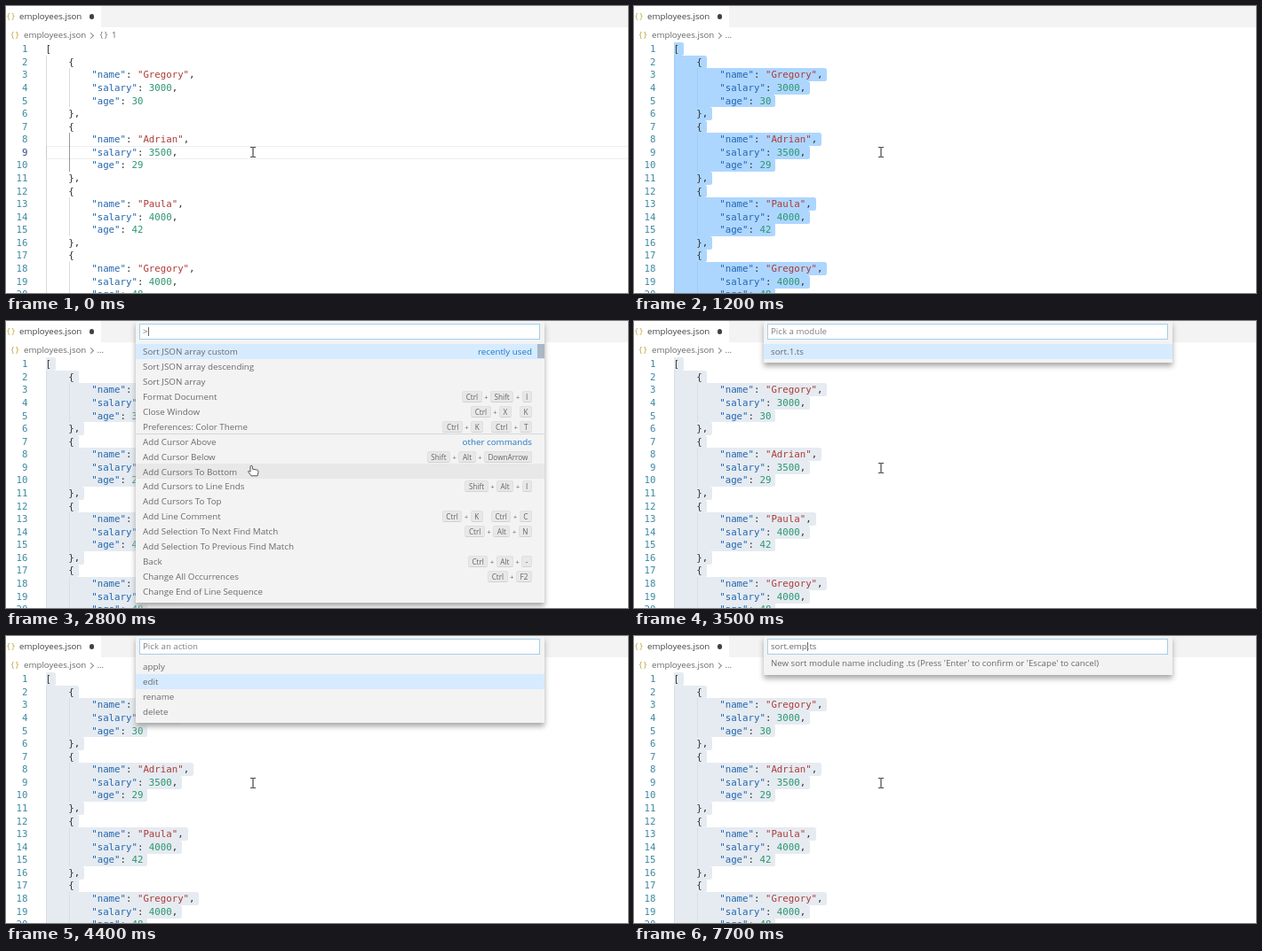
Animation of 700 by 324 pixels, one loop 8 s. Source, as an HTML page:

```html
<!DOCTYPE html>
<html lang="en">
<head>
<meta charset="utf-8">
<title>Sorting a JSON array</title>
<style>
html, body { margin: 0; width: 100%; height: 100%; overflow: hidden; background: #fff; }
body { position: relative; font: 9.7px "Open Sans", sans-serif; color: #6a6a6a; }
body div, .abs { position: absolute; white-space: pre; box-sizing: border-box; }
#stage { left: 0; top: 0; width: 700px; height: 324px; overflow: hidden; }
.mid { line-height: 20px; }
.json { letter-spacing: 1.6px; color: #bda63a; }
.chevron { width: 5px; height: 5px; border: solid #888; border-width: 1px 1px 0 0; transform: rotate(45deg); }
.code { font: 10.74px/14.58px "DejaVu Sans Mono", monospace; color: #333; }
.num { left: 0; width: 24.5px; text-align: right; color: #3f8aa1; }
.num.on { color: #2d4583; }
.key { color: #2366ae; } .str { color: #ad3a36; } .val { color: #2c966f; }
.sel { border-radius: 0 2.5px 2.5px 0; }
.picker { left: 146px; top: 0; width: 460px; background: #f3f3f3; box-shadow: 0 4px 6px #a8a8a8; }
.input { left: 4px; top: 3px; width: 451px; height: 18px; border: 1px solid #a3cfec; background: #fff; padding-left: 3px; line-height: 16px; }
.hint { color: #808080; }
.picked { background: #add6ff; }
.input i { display: inline-block; width: 1px; height: 10px; margin-right: -1px; background: #666; vertical-align: -2px; }
.row { left: 0; width: 460px; height: 16.885px; padding: 1px 14px 0 8px; display: flex; align-items: center; font-size: 9.8px; }
.row span:first-child { flex: 1; }
.row.first { border-top: 1px solid #d6d7da; }
.group { color: #1f78c4; }
kbd { font: 8.2px/11px "Open Sans", sans-serif; padding: 0 3.6px; border: 1px solid #e0e0e0; border-bottom-color: #d2d2d2; border-radius: 2.5px; background: #e8e8e8; color: #666; }
.plus { font-size: 8px; margin: 0 2.3px; }
.gap { width: 9px; }
</style>
</head>
<body>
<div id="stage"></div>
<script>
const LOOP = 8000, LEFT = 44.5, CHAR = 6.466, LINE = 14.58, TOP = 41.2, ROW = 16.885;
const stage = document.getElementById('stage');

const people = [['Gregory', 3000, 30], ['Adrian', 3500, 29], ['Paula', 4000, 42], ['Gregory', 4000, 48]];
const lines = ['['];
for (const [name, salary, age] of people)
  lines.push('    {', `        "name": "${name}",`, `        "salary": ${salary},`, `        "age": ${age}`, '    },');
lines.length = 20;

const commands = [
  ['Sort JSON array custom', '', 'recently used'],
  ['Sort JSON array descending'],
  ['Sort JSON array'],
  ['Format Document', 'Ctrl+Shift+I'],
  ['Close Window', 'Ctrl+X K'],
  ['Preferences: Color Theme', 'Ctrl+K Ctrl+T'],
  ['Add Cursor Above', '', 'other commands'],
  ['Add Cursor Below', 'Shift+Alt+DownArrow'],
  ['Add Cursors To Bottom'],
  ['Add Cursors to Line Ends', 'Shift+Alt+I'],
  ['Add Cursors To Top'],
  ['Add Line Comment', 'Ctrl+K Ctrl+C'],
  ['Add Selection To Next Find Match', 'Ctrl+Alt+N'],
  ['Add Selection To Previous Find Match'],
  ['Back', 'Ctrl+Alt+-'],
  ['Change All Occurrences', 'Ctrl+F2'],
  ['Change End of Line Sequence']
];
const modules = [['sort.1.ts']];
const actions = [['apply'], ['edit'], ['rename'], ['delete']];
const prompt = "New sort module name including .ts (Press 'Enter' to confirm or 'Escape' to cancel)";

// Each entry changes part of the state; "|" in the input is the caret.
const timeline = [
  [0, { active: 9, crumb: '1', sel: null, input: null, items: [], focus: 0, mouseY: 165 }],
  [300, { sel: [9, 8, 9, 22] }],
  [400, { sel: [8, 8, 10, 17], active: 10 }],
  [500, { sel: [7, 4, 11, 5], active: 11 }],
  [700, { sel: [7, 4, 11, 6] }],
  [900, { sel: [2, 4, 21, 0], active: 0 }],
  [1000, { sel: [1, 0, 21, 0] }],
  [1100, { crumb: '' }],
  [1700, { input: '>|' }],
  [1800, { items: commands }],
  [2200, { input: '>' }],
  [2800, { input: '>|' }],
  [2900, { input: '|Pick a module', hint: true, items: modules, mouseY: 166 }],
  [3500, { input: 'Pick a module' }],
  [3900, { input: null }],
  [4000, { input: '|Pick an action', items: actions }],
  [4400, { input: 'Pick an action', focus: 1 }],
  [4700, { input: 'sort.1.ts', hint: false, items: [], picked: true }],
  [5200, { input: 'sort.1.ts|', picked: false }],
  [5400, { input: 'sort.1.t|s' }],
  [5500, { input: 'sort.1.|ts' }],
  [5600, { input: 'sort.1|.ts' }],
  [6100, { input: 'sort.|.ts' }],
  [6400, { input: 'sort.e|.ts' }],
  [6600, { input: 'sort.epm|.ts' }],
  [6900, { input: 'sort.ep|.ts' }],
  [7000, { input: 'sort.e|.ts' }],
  [7500, { input: 'sort.em|.ts' }],
  [7700, { input: 'sort.emp|.ts' }]
];

const box = (x, y, w, h, style = '', cls = '') =>
  `<div class="${cls}" style="left:${x}px;top:${y}px;width:${w}px;height:${h}px;${style}"></div>`;
const label = (x, y, text, cls = '', style = '') =>
  `<div class="mid ${cls}" style="left:${x}px;top:${y - 10}px;${style}">${text}</div>`;
const lineTop = n => TOP + (n - 1) * LINE;

const colour = text => text.replace(/("\w+")(:?)|(\d+)/g, (all, quoted, colon, number) =>
  number ? `<span class="val">${number}</span>`
    : `<span class="${colon ? 'key' : 'str'}">${quoted}</span>${colon}`);

function header(s) {
  return box(107, 0, 593, 24, 'background:#f3f3f3')
    + label(1, 11.5, '{}', 'json')
    + label(15, 12, 'employees.json', '', 'color:#444')
    + box(93.8, 9.2, 5.4, 5.4, 'background:#424242;border-radius:50%')
    + label(5.5, 33, '{}', 'json')
    + label(20, 33, 'employees.json')
    + box(92.5, 31, 5, 5, '', 'chevron')
    + (s.crumb ? label(105.5, 33, '{}', 'json', 'color:#777') + label(119, 33, s.crumb)
      : label(102.5, 33, '…'));
}

function selection(s) {
  if (!s.sel) return box(LEFT, lineTop(s.active), 656, LINE + .5, 'border:solid #eee;border-width:1px 0 1px 1px');
  const [from, fromCol, to, toCol] = s.sel;
  const fill = `background:${s.input === null ? '#add6ff' : '#e5ebf1'}`;
  return lines.map((text, i) => {
    const n = i + 1;
    if (n < from || n > to) return '';
    const start = n === from ? fromCol : 0;
    const end = n === to ? toCol : text.length + .75;
    return box(LEFT + start * CHAR, lineTop(n), (end - start) * CHAR, LINE + .3, fill, 'sel');
  }).join('');
}

function editor(s) {
  const guide = (col, n, alpha) =>
    box(LEFT + .5 + col * CHAR, lineTop(n), 1, LINE, `background:rgba(0,0,0,${alpha})`);
  const alpha = s.active ? .14 : .05;
  return selection(s) + lines.map((text, i) => {
    const n = i + 1, y = `top:${lineTop(n) + 1}px`;
    const inner = text.startsWith('        ');
    const current = s.active && n > 7 && n < 11;
    return (i ? guide(0, n, alpha) : '')
      + (inner ? guide(4, n, current ? .4 : alpha) : '')
      + `<div class="code num ${n === s.active ? 'on' : ''}" style="${y}">${n}</div>`
      + `<div class="code" style="left:${LEFT}px;${y}">${colour(text)}</div>`;
  }).join('');
}

const keys = combo => combo.split(' ').map(part =>
  part.split('+').map(k => `<kbd>${k}</kbd>`).join('<span class="plus">+</span>')
).join('<span class="gap"></span>');

function picker(s) {
  if (s.input === null) return '';
  const long = s.items === commands;
  const height = s.items.length ? 30.5 + s.items.length * ROW : 44;
  const rows = s.items.map(([text, combo, group], i) => {
    const fill = i === s.focus ? '#d6ebff' : long && i === 8 ? '#e8e8e8' : 'none';
    return `<div class="row ${group && i ? 'first' : ''}" style="top:${26 + i * ROW}px;background:${fill}">`
      + `<span>${text}</span>${combo ? keys(combo) : ''}${group ? `<span class="group">${group}</span>` : ''}</div>`;
  }).join('');
  const value = s.input.replace('>', '&gt;').replace('|', '<i></i>');
  return `<div class="picker" style="height:${height}px">`
    + `<div class="input ${s.hint ? 'hint' : ''}"><span class="${s.picked ? 'picked' : ''}">${value}</span></div>`
    + rows
    + (long ? box(452, 26, 8, 15.5, 'background:#a9b7c6') : '')
    + (s.items.length || s.input[0] === '>' ? '' : label(8, 31, prompt))
    + '</div>';
}

function mouse(s) {
  const hand = s.input !== null && s.items === commands;
  const shape = hand
    ? '<path d="M-3 1.2V-5q1.2-1.6 2.4 0v3.2l5.2.9q1.6.5 1.4 2.3L5 5.8H-2L-5.6 1.2q0-1.9 2.6 0z" fill="#fff" stroke="#555"/>'
    : '<path d="M-3-5.5h2L0-5 1-5.5h2M-3 5.5h2L0 5 1 5.5h2M0-5V5" fill="none" stroke="#444" stroke-width="1.2"/>';
  const y = hand ? 169 : s.mouseY;
  return `<svg class="abs" style="left:267.5px;top:${y - 10}px" width="20" height="20" viewBox="-10 -10 20 20">${shape}</svg>`;
}

let shown = -1;
function frame(now) {
  const time = now % LOOP;
  const index = timeline.filter(([start]) => start <= time).length;
  if (index !== shown) {
    shown = index;
    const s = Object.assign({}, ...timeline.slice(0, index).map(([, change]) => change));
    stage.innerHTML = header(s) + editor(s) + picker(s) + mouse(s);
  }
  requestAnimationFrame(frame);
}
frame(0);
</script>
</body>
</html>
```
